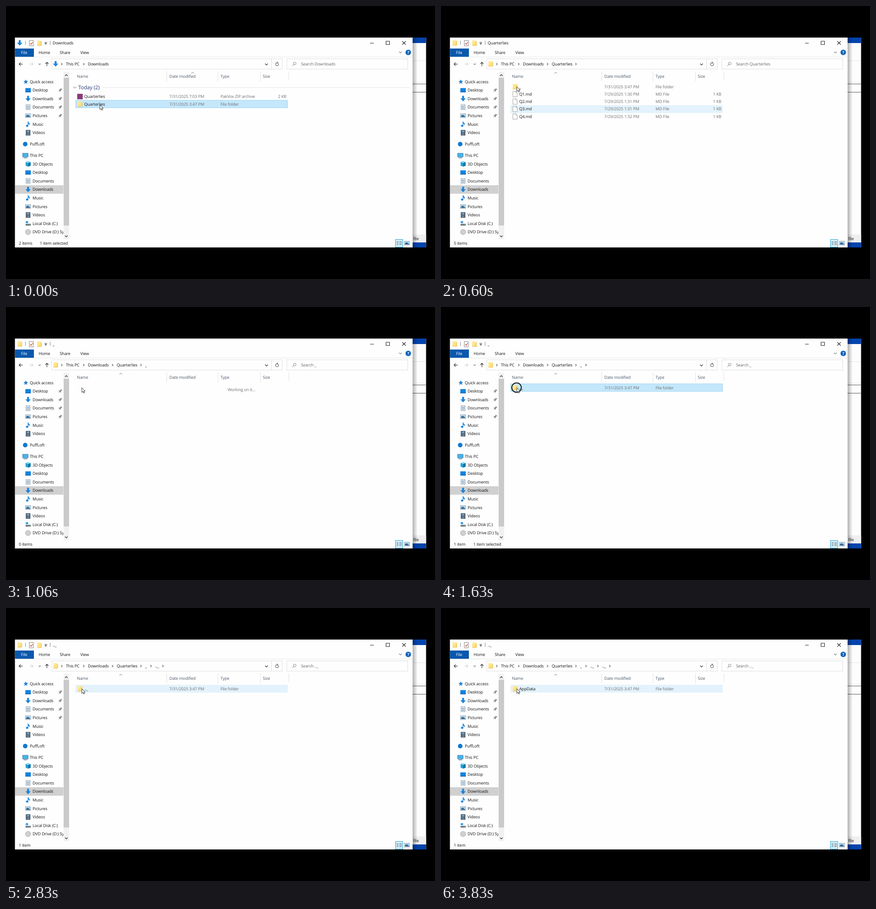
Recreate the animation shown at these times as an HTML page. Size 938 by 597 pixels, loop 3860 ms.

```html
<!DOCTYPE html>
<html lang="en">
<head>
<meta charset="utf-8">
<title>File browser</title>
<style>
html, body { margin: 0; width: 100%; height: 100%; overflow: hidden; background: #000; }
svg { display: block; }
text {
  font: 9px "Open Sans", "Noto Sans", sans-serif;
  letter-spacing: -.15px;
  fill: #151515;
  text-rendering: geometricPrecision;
  white-space: pre;
}
</style>
</head>
<body>
<svg id="stage" width="938" height="597" viewBox="0 0 938 597">
  <defs>
    <linearGradient id="shade"><stop stop-color="#000" stop-opacity=".3"/><stop offset="1" stop-color="#000" stop-opacity="0"/></linearGradient>
    <linearGradient id="gold" x2="1" y2="1"><stop stop-color="#ffedaa"/><stop offset="1" stop-color="#f9d866"/></linearGradient>
    <clipPath id="side"><rect x="20" y="142" width="105.5" height="366"/></clipPath>
  </defs>
  <g id="base"></g>
  <g id="view"></g>
  <circle id="ring" cx="165.2" cy="176.3" r="10.4" fill="none" stroke="#080808" stroke-width="1.9"/>
  <path id="cursor" d="M0 0V10.2L2.5 8L4.2 11.7L5.8 11L4.2 7.4H7.3Z" fill="#fff" stroke="#111" stroke-width=".85"/>
</svg>
<script>
const LOOP = 3860;
const $ = id => document.getElementById(id);

const rect = (x, y, w, h, fill, extra = '') =>
  `<rect x="${x}" y="${y}" width="${w}" height="${h}" fill="${fill}" ${extra}/>`;
const line = (d, color, w = 1, extra = '') =>
  `<path d="${d}" fill="none" stroke="${color}" stroke-width="${w}" ${extra}/>`;
const shape = (d, fill) => `<path d="${d}" fill="${fill}"/>`;
const text = (x, y, s, style = '', anchor = 'start') =>
  `<text x="${x}" y="${y + 3.2}" text-anchor="${anchor}" style="${style}">${s}</text>`;
const at = (x, y, s) => `<g transform="translate(${x} ${y})">${s}</g>`;
const chevron = (x, y) => line(`M${x - 1.2} ${y - 2.3}l2.3 2.3l-2.3 2.3`, '#555', 1.1);

// Icons are drawn around their own centre.
const icons = {
  folder: shape('M-5 -6H1L2 -5H5.2V5.6H-5Z', 'url(#gold)') + line('M4.4 -4V5.3H-4.6', '#e5bd50', .8),
  page: shape('M-4.6 -6H2L4.8 -3.2V6H-4.6Z', '#fff') + line('M-4.6 -6H2L4.8 -3.2V6H-4.6ZM2 -6V-3.2H4.8', '#8d8d8d', .8),
  zip: rect(-6, -6, 12, 12, '#8a3a78'),
  star: shape('M0 -5L1.5 -1.7L5 -1.3L2.4 1L3.2 4.7L0 2.8L-3.4 4.7L-2.4 1L-5 -1.3L-1.5 -1.7Z', '#2583d4'),
  desktop: rect(-6, -4.5, 12, 9, '#1383dd') + rect(-6, 3, 12, 1.5, '#0a63b5'),
  down: shape('M-2.1 -6H2.1V-.5H5.8L0 6L-5.8 -.5H-2.1Z', '#1b84dc'),
  doc: rect(-4.5, -5.5, 9, 11, '#f4f7fa', 'stroke="#7d8b97" stroke-width=".8"') +
    line('M-3 -3H-.5M1 -3H3M-3 -1H3M-3 1H-.5M1 1H3M-3 3H3', '#4d83ad', 1),
  picture: rect(-5.8, -4.2, 11.6, 8.4, '#f3f8fc', 'stroke="#7f8d98" stroke-width=".8"') +
    rect(-4.6, -3, 9.2, 3, '#8ec8ef') + shape('M-4.6 3V.5L-1 -1.5L4.6 1.5V3Z', '#2b638d'),
  music: shape('M-.8 -6H.6Q1 -3.4 3.5 -1.7Q4.8 -.3 3.2 2.5Q3 -.3 .6 -1V3.5A2.7 2.2 0 1 1 -.8 1.7Z', '#1b87dd'),
  video: rect(-5, -6, 10, 12, '#39424b') + rect(-2.7, -5, 5.4, 4.5, '#6fa4cc') + rect(-2.7, .6, 5.4, 4.5, '#6886a5') +
    line('M-4 -5V6M4 -5V6', '#ccc', .9, 'stroke-dasharray="1 1.2"'),
  cloud: `<circle r="5" fill="#1179cf"/>`,
  pc: rect(-6, -5, 12, 8, '#46b4ed', 'stroke="#3a6f91" stroke-width=".8"') + line('M-4 5H4', '#4c7c9b', 1.3),
  cube: shape('M-5.5 -4L0 -6L5.5 -4V4L0 6L-5.5 4Z', '#29a3d8') + shape('M0 -2L5.5 -4V4L0 6Z', '#0e78a8') +
    shape('M-5.5 -4L0 -6L5.5 -4L0 -2Z', '#8adcf5'),
  disk: rect(-5.5, 1, 11.5, 3.5, '#68737b') + rect(-5.5, 0, 11.5, 1.2, '#b9c2c8') + rect(-5, -5, 5, 4, '#2493df') + rect(3, 2.3, 1.7, 1, '#6df08b'),
  dvd: `<circle r="5.8" fill="#d2d2d2" stroke="#9c9c9c" stroke-width=".8"/><circle r="1.6" fill="#fff" stroke="#999" stroke-width=".7"/>`,
  pin: `<g transform="rotate(45)">${shape('M-2 -4H2V-3L1.4 -2.5V0L3 1.2V2H-3V1.2L-1.4 0V-2.5L-2 -3Z', '#7d858c')}${line('M0 2V5', '#7d858c', .9)}</g>`
};
const icon = (name, x, y) => at(x, y, icons[name]);

function sidebar() {
  const group = (top, items, pins = 0) => items.map(([name, label], i) => {
    const y = top + i * 18.62;
    return icon(name, 48.3, y) + text(58, y, label) + (i < pins ? icon('pin', 118.5, y) : '');
  }).join('');
  return rect(20, 392, 105.5, 18.5, '#d0d0d0') + `<g clip-path="url(#side)">` +
    icon('star', 43.3, 165.5) + text(52, 165.5, 'Quick access') +
    group(184, [['desktop', 'Desktop'], ['down', 'Downloads'], ['doc', 'Documents'],
      ['picture', 'Pictures'], ['music', 'Music'], ['video', 'Videos']], 4) +
    icon('cloud', 42, 302) + text(52, 302, 'PuffLoft') +
    icon('pc', 42.3, 327) + text(52, 326.6, 'This PC') +
    group(345.3, [['cube', '3D Objects'], ['desktop', 'Desktop'], ['doc', 'Documents'], ['down', 'Downloads'],
      ['music', 'Music'], ['picture', 'Pictures'], ['video', 'Videos'], ['disk', 'Local Disk (C:)'], ['dvd', 'DVD Drive (D:) Sys']]) +
    '</g>' + rect(126, 144, 12, 366, '#f1f1f1') + rect(126, 157, 12, 323, '#cacaca') +
    line('M129 153l2.9 -3l2.9 3M129 502l2.9 3l2.9 -3', '#444', 1.4);
}

function backdrop() {
  return rect(880, 69, 38.5, 459, '#fdfdfd') + rect(880, 69, 38.5, 12, '#0344ad') +
    rect(880, 517, 38.5, 11, '#0344ad') + rect(880, 499.5, 38.5, 17.5, '#efefef') +
    line('M880 119.5H918M880 166.5H918', '#e4e4e4') + line('M880 170.5H918M880 188.5H918', '#555', 1) +
    text(890.5, 509, 'file') + rect(889, 69, 11, 459, 'url(#shade)');
}

function chrome() {
  const soft = '#dedede';
  return rect(19.5, 69, 869.5, 459, '#fefefe') +
    line('M42.5 76V85M96.5 76V85', '#888') +
    rect(51, 75.5, 9, 11.5, '#fff', 'stroke="#777" stroke-width=".9"') + line('M53 81.5l2 2.3l3.5 -5', '#d1552c', 1.4) +
    icon('folder', 73, 81.3) + line('M84.3 79.5H89.7', '#333') + shape('M84.2 81.5H89.8L87 84.3Z', '#333') +
    line('M796 81.2H804M831 77H838.5V84.3H831ZM866.5 77L874 84.5M874 77L866.5 84.5', '#222', 1.1) +
    rect(19.5, 93, 41.5, 18, '#0a58ad') + text(39.5, 102, 'File', 'fill:#fff', 'middle') +
    text(71.5, 102, 'Home') + text(117.5, 102, 'Share') + text(162.5, 102, 'View') +
    line('M19.5 111.5H889', '#e7e7e7') + line('M859.5 100l2.8 2.8l2.8 -2.8', '#777', 1.1) +
    `<circle cx="879.5" cy="101.5" r="6" fill="#0b62b8"/>` + text(879.6, 101.5, '?', 'fill:#fff;font-weight:700', 'middle') +
    line('M36.5 127H28.5M32 123.5L28.5 127L32 130.5M89.5 131.5V123M86 126.5L89.5 123L93 126.5', '#444', 1.25) +
    line('M51 127H59M55.8 123.7L59 127L55.8 130.3', '#cfcfcf', 1.1) + line('M71.5 126l2.2 2.2l2.2 -2.2', '#777', 1.1) +
    rect(100, 115.5, 504, 22.5, '#fefefe', `stroke="${soft}"`) + line('M580.5 115.5V138', soft) +
    line('M566.5 126l3 3l3 -3', '#444', 1.3) + line('M595.3 125.3A3.3 3.3 0 1 1 592 124M592 122l2.5 2l-2.5 2', '#555', 1.1) +
    rect(614, 115.5, 264.5, 22.5, '#fefefe', `stroke="${soft}"`) +
    `<circle cx="631.3" cy="125.8" r="2.9" fill="none" stroke="#777" stroke-width=".9"/>` + line('M629.2 128L626 131.2', '#777', 1) +
    line('M351.5 143V165M463.5 143V165M556.5 143V165M618.5 143V162', '#e1e1e1') +
    [[155, 'Name'], [357, 'Date modified'], [469, 'Type'], [561.5, 'Size']]
      .map(([x, s]) => text(x, 154, s, 'fill:#4c5a68')).join('') +
    rect(851.5, 510.5, 16, 17, '#d0edfa', 'stroke="#38a5cf"') +
    line('M854 515.5H858M854 518.5H858M854 521.5H858M860 515.5H865.5M860 518.5H865.5M860 521.5H865.5', '#51636f', 1) +
    icon('picture', 876.7, 518.5);
}

const folderDate = '7/31/2025 3:47 PM';
const folder = (name, y = 176.3) => ({ y, icon: 'folder', name, date: folderDate, type: 'File folder', size: '' });
const quarter = (n, min) => ({ y: 176.3 + n * 16.3, icon: 'page', name: `Q${n}.md`, date: `7/29/2025 1:${min} PM`, type: 'MD File', size: '1 KB' });

const places = {
  downloads: {
    title: 'Downloads', path: [], status: '2 items', today: true,
    rows: [{ y: 198, icon: 'zip', name: 'Quarterlies', date: '7/31/2025 7:03 PM', type: 'PakVox ZIP archive', size: '2 KB' }, folder('Quarterlies', 214.4)]
  },
  quarters: {
    title: 'Quarterlies', path: ['Quarterlies'], status: '5 items',
    rows: [folder('_'), quarter(1, 30), quarter(2, 31), quarter(3, 31), quarter(4, 32)]
  },
  first: { title: '_', path: ['Quarterlies', '_'], status: '1 item', rows: [folder('.._')] },
  second: { title: '.._', path: ['Quarterlies', '_', '.._'], status: '1 item', rows: [folder('.._')] },
  third: { title: '.._', path: ['Quarterlies', '_', '.._', '.._'], status: '1 item', rows: [folder('AppData')] }
};
const crumbX = [242, 304, 326, 352], crumbEnd = [295, 317, 343, 369];

// start, place, mode, row
const steps = [
  [0, 'downloads', 'select', 1],
  [270, 'quarters', 'hover', 3],
  [640, 'quarters', 'hover', 0],
  [780, 'quarters', 'select', 0],
  [980, 'first', 'load'],
  [1150, 'first', 'hover', 0],
  [1560, 'first', 'select', 0],
  [2480, 'second', 'load'],
  [2620, 'second', 'hover', 0],
  [3480, 'second', 'select', 0],
  [3640, 'third', 'hover', 0]
];
// start, end of each press mark
const presses = [[780, 860], [900, 960], [1570, 1690], [3480, 3540], [3580, 3630]];

function drawRow(row, mode) {
  const gray = 'fill:#6e6e6e', top = row.y - 8.3;
  const back = mode === 'select' ? rect(152.5, top, 463, 16.5, '#c4e7fb', 'stroke="#9dd3f2"')
    : mode === 'hover' ? rect(152, top, 464, 17, '#e3f2fc') : '';
  return back + icon(row.icon, 161.7, row.y) + text(171, row.y, row.name) +
    text(357, row.y, row.date, gray) + text(469, row.y, row.type, gray) + text(613, row.y, row.size, gray, 'end');
}

function drawView([, key, mode, active]) {
  const p = places[key], loading = mode === 'load', home = !p.path.length;
  let s = text(102, 81, p.title) + text(645, 127, 'Search ' + p.title, 'fill:#666') +
    icon(home ? 'down' : 'folder', 30, 80.7) + icon(home ? 'down' : 'folder', 108.5, 126.5) +
    chevron(122, 127) + text(131, 127, 'This PC') + chevron(170, 127) + text(179, 127, 'Downloads');
  if (!home) s += chevron(233, 127);
  p.path.forEach((name, i) => {
    s += text(crumbX[i], 127, name);
    if (!loading || i < p.path.length - 1) s += chevron(crumbEnd[i], 127);
  });
  s += line(`M${home ? 405 : 248} 147.5l2.9 -2.8l2.9 2.8`, '#777', 1);
  if (p.today) {
    s += line('M147.3 176.5l3.2 3.2l3.2 -3.2', '#555', 1) +
      text(158, 178.7, 'Today (2)', 'font-size:11.5px;fill:#253c78') + line('M211 178.5H882', '#e6e6e6');
  }
  if (loading) return s + text(515, 181, 'Working on it...', 'fill:#6e6e6e', 'middle') + text(28, 519, '0 items');
  p.rows.forEach((row, i) => { s += drawRow(row, i === active ? mode : ''); });
  s += text(28, 519, p.status);
  if (mode === 'select') s += text(home ? 74 : 70.5, 519, '1 item selected');
  return s;
}

$('base').innerHTML = backdrop() + chrome() + sidebar();
let shown;

function frame(now) {
  const t = now % LOOP;
  const step = steps.filter(s => s[0] <= t).pop();
  if (step !== shown) {
    $('view').innerHTML = drawView(step);
    shown = step;
  }
  const k = Math.min(1, Math.max(0, (t - 400) / 170)), e = k * k * (3 - 2 * k);
  $('cursor').setAttribute('transform', `translate(${205.3 - 39.5 * e} ${216.2 - 39.7 * e})`);
  $('ring').style.display = presses.some(([a, b]) => t >= a && t < b) ? '' : 'none';
  requestAnimationFrame(frame);
}
const start = performance.now();
const tick = () => performance.now() - start;
frame(0);
</script>
</body>
</html>
```
